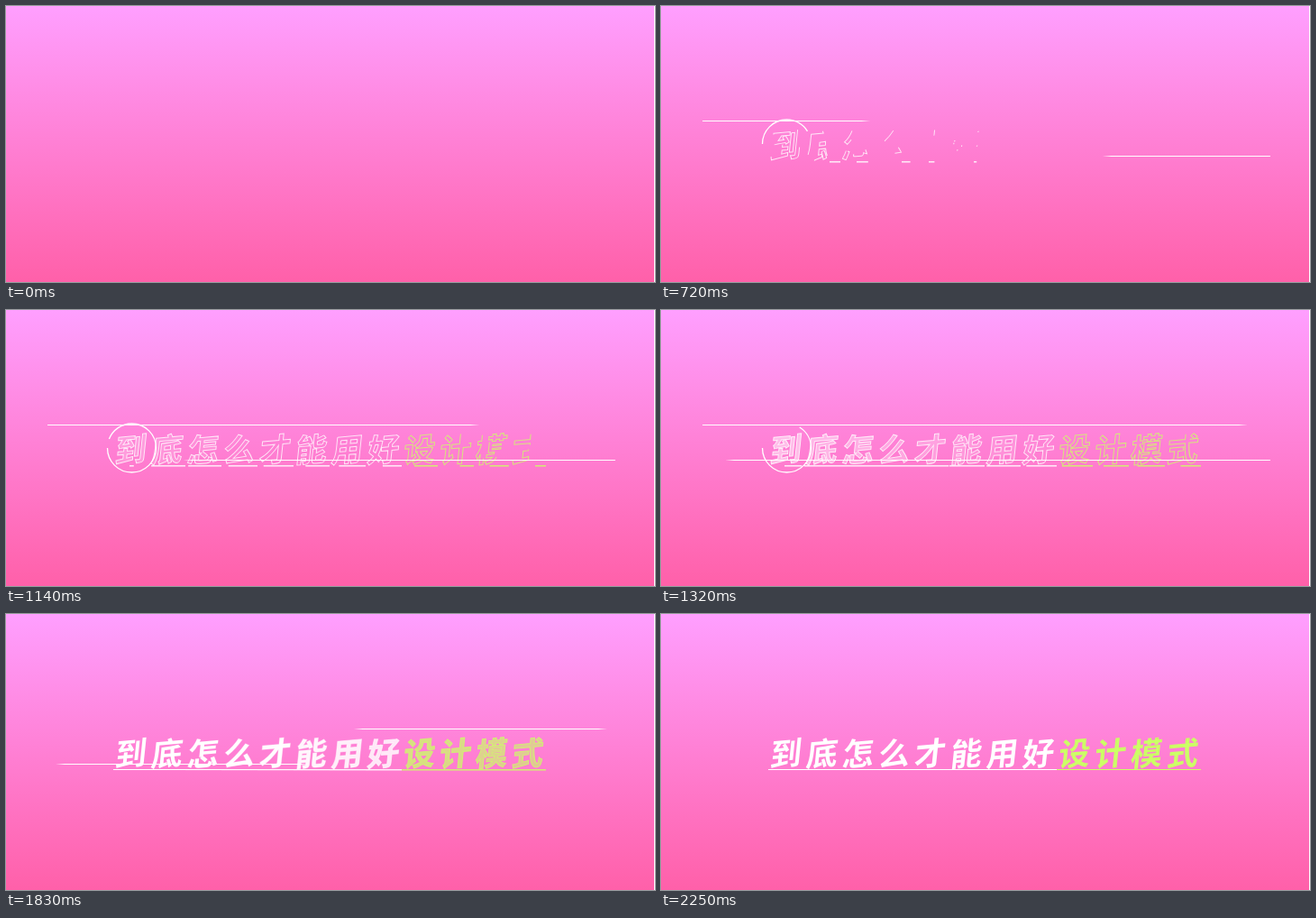
Recreate the animation shown at these times as an HTML page. Size 720 by 306 pixels, loop 2.73 s.

```html
<!DOCTYPE html>
<html lang="zh-CN">
<head>
<meta charset="utf-8">
<title>到底怎么才能用好设计模式</title>
<style>
  html, body { margin: 0; width: 100%; height: 100%; overflow: hidden; }
  html { background: #fff; }
  body { width: 719px; background: linear-gradient(#ff9fff, #ff60a9); }
  html { background-clip: border-box; }
  svg { display: block; width: 719px; height: 306px; }
  text {
    font: 900 35px "Noto Sans CJK SC", "Noto Sans CJK", "Noto Sans CJK JP", sans-serif;
    text-anchor: middle;
    stroke-width: 1;
  }
  .ring { fill: none; stroke: #fff; stroke-width: 1.3; }
  .line { fill: #fff; }
</style>
</head>
<body>
<svg viewBox="0 0 719 306">
  <g id="title"></g>
  <path class="ring" id="ring" pathLength="1" d="M112.5 153a27 27 0 0 1 54 0a27 27 0 0 1-54 0"/>
  <path class="line" id="upper"/>
  <path class="line" id="lower"/>
</svg>
<script>
const LOOP = 2730, TICK = 30;
const START = 453, LINE_TIME = 890, LINE_LENGTH = 621, RING_TIME = 648;
const STAGGER = 40, DRAW_TIME = 500, FILL_TIME = 700, OUTLINE = 240;
const LEFT = 119, PITCH = 40;

const byId = id => document.getElementById(id);
const clamp = v => Math.min(1, Math.max(0, v));

function add(parent, tag, attrs) {
  const el = document.createElementNS("http://www.w3.org/2000/svg", tag);
  set(el, attrs);
  return parent.appendChild(el);
}

function set(el, attrs) {
  for (const key in attrs) el.setAttribute(key, attrs[key]);
}

const glyphs = [..."到底怎么才能用好设计模式"].map((char, i) => {
  const color = i < 8 ? "#fff" : "#ccff66";
  const x = LEFT + i * PITCH;
  const group = add(byId("title"), "g", {
    transform: `translate(${x + PITCH / 2} 154) skewY(-5) skewX(-6)`
  });
  const text = add(group, "text", { y: 13.5, fill: color, stroke: color });
  text.textContent = char;
  const rule = add(byId("title"), "rect", { y: 172, fill: color });
  return { text, rule, x, begin: 480 + i * STAGGER, seed: i % 2 ? 28 : 18 };
});

function drawGlyph(glyph, index, t) {
  const age = t - glyph.begin;
  const drawn = clamp(age / DRAW_TIME);
  const fade = 1 - clamp((age - 1000) / 300);
  set(glyph.text, {
    visibility: age > 0 ? "visible" : "hidden",
    "fill-opacity": clamp((age - DRAW_TIME) / FILL_TIME),
    "stroke-opacity": 0.8 * fade,
    "stroke-dasharray": drawn < 1 ? `${OUTLINE * drawn ** 2} 999` : "none"
  });

  // The underline spreads right from a seed point, then back to the left.
  const ruleAge = index ? age : age - 600;
  const right = Math.min(PITCH, glyph.seed + ruleAge * 0.08);
  const left = glyph.seed * (1 - clamp((ruleAge - 250) / 400));
  set(glyph.rule, {
    x: glyph.x + left,
    width: Math.max(0, right - left),
    height: 1 + 0.6 * fade,
    opacity: 1 - 0.2 * fade
  });
}

// A one pixel line whose moving ends narrow to a point.
function drawLine(el, origin, direction, y, t) {
  const progress = (t - START) / LINE_TIME;
  const head = clamp(progress) * LINE_LENGTH;
  const tail = clamp(progress - 1) * LINE_LENGTH;
  const taper = Math.min(10, (head - tail) / 2);
  const at = d => origin + direction * d;
  const tailTaper = tail > 0 ? taper : 0;
  el.setAttribute("d", head > tail
    ? `M${at(tail)} ${y + 0.5}L${at(tail + tailTaper)} ${y}H${at(head - taper)}` +
      `L${at(head)} ${y + 0.5}L${at(head - taper)} ${y + 1}H${at(tail + tailTaper)}Z`
    : "");
}

function drawRing(t) {
  const progress = (t - START) / RING_TIME;
  const head = clamp(progress), tail = clamp(progress - 1);
  set(byId("ring"), {
    visibility: head > tail ? "visible" : "hidden",
    "stroke-dasharray": `0 ${tail} ${head - tail} 2`
  });
}

function render(now) {
  const t = Math.floor((now % LOOP) / TICK) * TICK;
  glyphs.forEach((glyph, i) => drawGlyph(glyph, i, t));
  drawRing(t);
  drawLine(byId("upper"), 46, 1, 127, t);
  drawLine(byId("lower"), 676, -1, 166, t);
}

function frame() {
  render(performance.now());
  requestAnimationFrame(frame);
}
frame();
</script>
</body>
</html>
```
